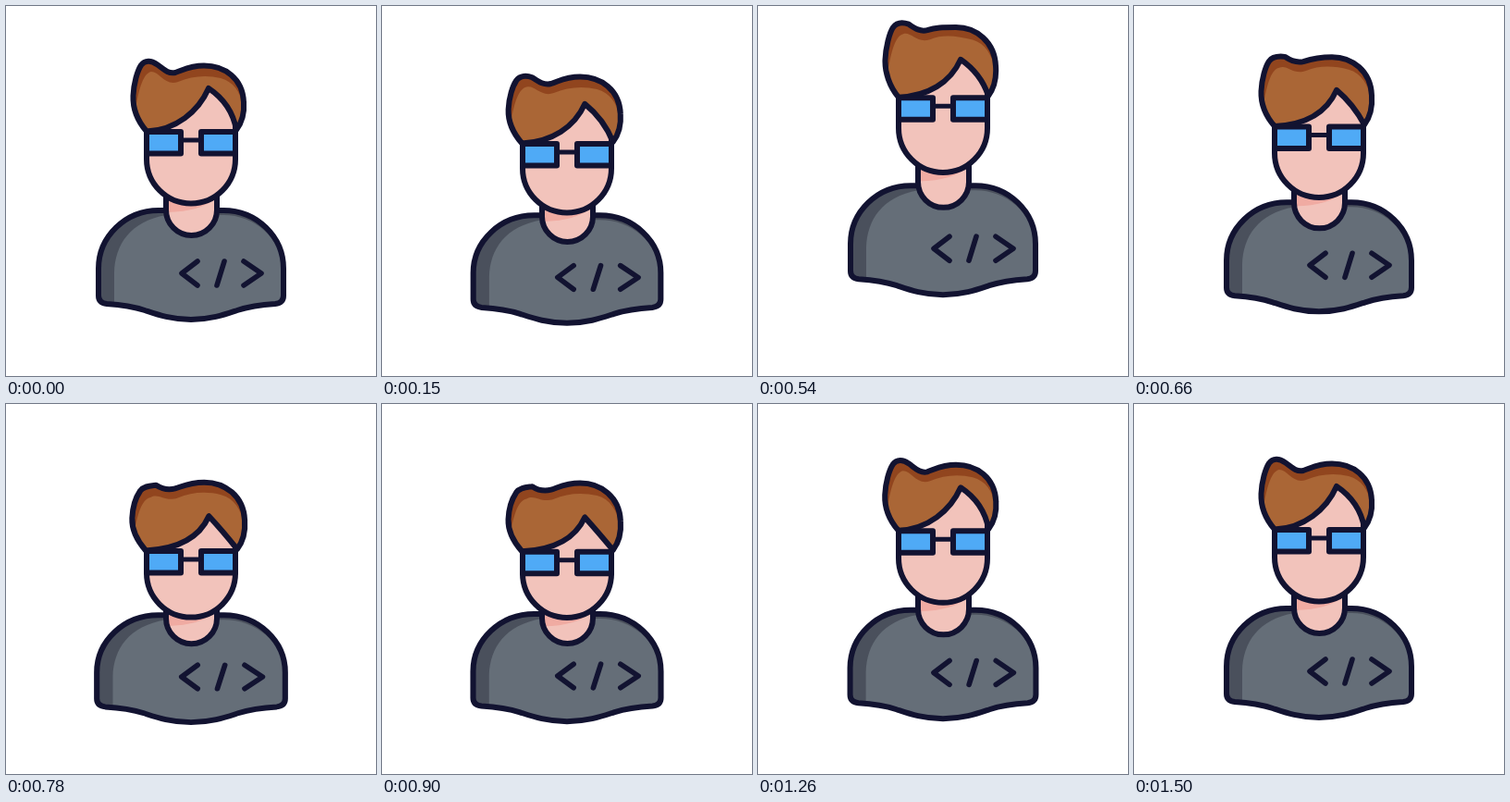
Animation, 400 px wide and 400 px high, one loop 3530 ms. Source, as an HTML page:

```html
<!DOCTYPE html>
<html lang="en">
<head>
<meta charset="utf-8">
<title>Jumping developer</title>
<style>
  html, body { margin: 0; height: 100%; overflow: hidden; background: #fff; }
  svg { display: block; width: 100vw; height: 100vh; }
  .line { fill: none; stroke: #121331; stroke-width: 6; stroke-linecap: round; stroke-linejoin: round; }
  .skin { fill: #f2c3bb; }
  .shade { fill: #f0aba2; }
  .lens { fill: #4faaf6; }
  .thin { stroke-width: 5; }
</style>
</head>
<body>
<svg viewBox="0 0 400 400">
  <g id="body">
    <path id="torso" fill="#4a505c"/>
    <path id="torsoLight" fill="#656e78"/>
    <path id="torsoLine" class="line"/>
    <path class="line" style="stroke-width:5.6" d="M207 276L190 289L207 302M236 276L228 302M257 276L276 289L257 302"/>
  </g>
  <path id="neck" class="skin"/>
  <path id="neckShade" class="shade"/>
  <path id="neckLine" class="line"/>
  <path id="face" class="line skin"/>
  <g id="hair">
    <path id="hairDark" fill="#91451e"/>
    <path id="hairLight" fill="#aa6636"/>
    <path id="hairLine" class="line"/>
  </g>
  <g id="glasses">
    <path class="line lens" d="M152 136H189V159.500H152ZM211 136H248V159.500H211Z"/>
    <path class="line thin" d="M191 145H209"/>
  </g>
</svg>
<script>
const LOOP = 3530, STEP = 30;

// Turning points as [ms, value]: the hop, and how far the head lags behind it.
const hop = [[0, 0], [80, 8], [430, -34], [830, 7], [1040, -3], [1200, 2], [1350, 0]];
const lag = [[0, 0], [200, 7], [480, -8], [860, 14], [1080, 0]];

const $ = id => document.getElementById(id);
const setPath = (id, d) => $(id).setAttribute("d", d);
const ease = u => (1 - Math.cos(Math.PI * Math.min(1, Math.max(0, u)))) / 2;

// Each turning point adds its eased step from the one before.
const swing = (keys, t) => keys.slice(1).reduce((sum, [end, v], i) => {
  const [start, from] = keys[i];
  return sum + (v - from) * ease((t - start) / (end - start));
}, 0);

const widen = (id, w) =>
  $(id).setAttribute("transform", `translate(200 0) scale(${1 + w} 1) translate(-200 0)`);

function drawTorso(y, w) {
  const right = "H235A65 63 0 0 1 300 284V313Q300 321 291 322"
    + "C274 323 262 325 250 329S222 339 200 339S162 333 150 329S126 323 ";
  const outline = "M100 284A65 63 0 0 1 165 221" + right + "109 322Q100 321 100 313Z";
  setPath("torso", outline);
  setPath("torsoLine", outline);
  setPath("torsoLight", "M117 322V288C118 258 134 233 173 226" + right + "117 322Z");
  $("body").setAttribute("transform",
    `translate(200 ${322 + y}) scale(${1 + w} ${1 - w}) translate(-200 -322)`);
}

function drawNeck(bottom, chin) {
  const y = 220.5 + bottom, top = 195 + chin;
  const u = `M173 ${top}V${y}A27.5 27.5 0 0 0 228 ${y}V${top}`;
  setPath("neck", u);
  setPath("neckLine", u);
  setPath("neckShade", `M174 ${top}H227V${top + 12}Q212 ${top + 27} 174 ${top + 28}Z`);
}

function drawFace(chin, peak) {
  const y = 165.5 + chin, brow = 87 + peak;
  setPath("face", `M152 ${brow}V${y}A48 48 0 0 0 248 ${y}V${brow}`);
}

// Hair points ride on the offset of the nearest anchor.
function drawHair(o, bulge) {
  const at = (...names) => {
    const dy = names.reduce((sum, n) => sum + o[n], 0) / names.length;
    return (x, y) => `${x} ${y + dy} `;
  };
  const g = at("glasses"), h = at("hump"), d = at("dip"), t = at("top"), k = at("peak");
  const left = at("glasses", "hump"), side = at("glasses", "top"), mid = at("hump", "dip");
  const third = (o.glasses - o.peak) / 3;
  const fringe = "C" + g(239 + 7 * bulge, 119 - third - 2 * bulge)
    + k(229 + 8 * bulge, 104 + third - 3 * bulge) + k(219, 89)
    + "C" + k(208, 114) + g(184, 134) + g(152, 135.5) + "Z";
  const outline = "M" + g(152, 135.5)
    + "C" + g(142, 124) + left(137, 110) + left(137.5, 97)
    + "C" + left(138, 84) + h(142, 70) + h(146, 64)
    + "C" + h(150, 58.5) + h(157, 58.5) + mid(163, 63)
    + "C" + mid(169, 67) + d(175, 74) + d(183, 72)
    + "C" + d(192, 69) + t(199, 64.5) + t(214, 64.5)
    + "C" + t(236, 64.5) + side(256, 78) + side(257, 104)
    + "C" + side(258, 117) + g(255, 126) + g(249, 134) + fringe;
  setPath("hairDark", outline);
  setPath("hairLine", outline);
  setPath("hairLight", "M" + g(152, 135.5)
    + "C" + g(144, 126) + left(140, 118) + left(140, 111)
    + "C" + left(143, 95) + h(147, 73) + h(157, 71)
    + "C" + mid(166, 71) + d(172, 87) + d(186, 82)
    + "C" + d(200, 76) + t(216, 74) + t(232, 78)
    + "C" + t(246, 82) + side(253, 92) + side(256, 108)
    + "C" + side(257, 117) + g(255, 126) + g(249, 134) + fringe);
}

function draw(t) {
  const y = swing(hop, t), q = swing(lag, t);
  const flat = ease((t - 60) / 210) - ease((t - 900) / 180);
  const wide = Math.max(0, y) / 300;
  const follow = (weight, shift = 0) => y + weight * q + shift * flat;
  const chin = follow(1);
  const offsets = {
    glasses: follow(1.5),
    hump: follow(2.1),
    dip: follow(1.8, -7),
    top: follow(1.6, -4),
    peak: follow(1.7, 7)
  };
  drawTorso(y, wide);
  drawNeck(follow(0.5), chin);
  drawFace(chin, offsets.peak);
  drawHair(offsets, 1 - flat / 2 - q / 28);
  widen("hair", wide);
  $("glasses").setAttribute("transform", `translate(0 ${offsets.glasses})`);
}

const start = performance.now();
function tick() {
  const t = (performance.now() - start) % LOOP;
  draw(Math.floor(t / STEP) * STEP);
  requestAnimationFrame(tick);
}
tick();
</script>
</body>
</html>
```
